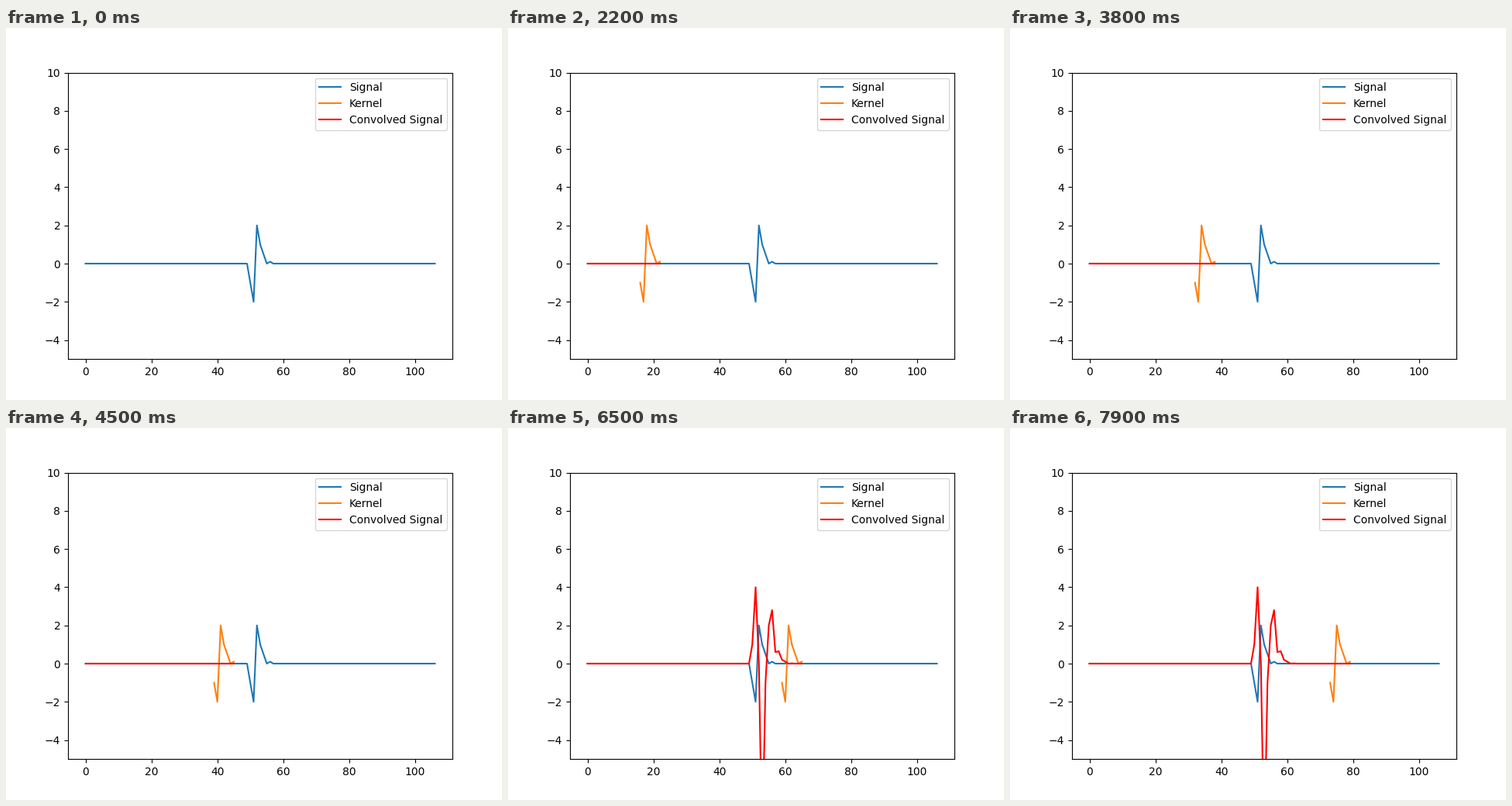
Recreate the animation shown at these times as a matplotlib script. Size 640 px wide and 480 px high, loop 8 s.

```python
import numpy as np
import matplotlib.pyplot as plt
from matplotlib.animation import FuncAnimation

FRAMES = 80
INTERVAL = 100

kernel = np.array([-1, -2, 2, 1, 0.5, 0, 0.1])
signal = np.concatenate([np.zeros(50), kernel, np.zeros(50)])
convolved = np.convolve(signal, kernel)[:len(signal)]
# A direct sum keeps the silent stretches exactly flat
x = np.arange(len(signal))

fig, ax = plt.subplots(figsize=(6.4, 4.8), dpi=100)
ax.plot(x, signal, label="Signal")
kernel_line, = ax.plot([], [], label="Kernel")
conv_line, = ax.plot([], [], color="red", label="Convolved Signal")
ax.set_xlim(-5.3, 111.3)
ax.set_ylim(-5, 10)
ax.legend(loc="upper right")


def update(i):
    """Slide the kernel so it ends at sample i, and reveal the result."""
    end = i + 1
    width = min(end, len(kernel))
    kernel_line.set_data(x[end - width:end], kernel[-width:])
    conv_line.set_data(x[:end], convolved[:end])
    return kernel_line, conv_line


anim = FuncAnimation(fig, update, frames=FRAMES, interval=INTERVAL,
                     repeat=True, repeat_delay=0, blit=False)
plt.show()
```
